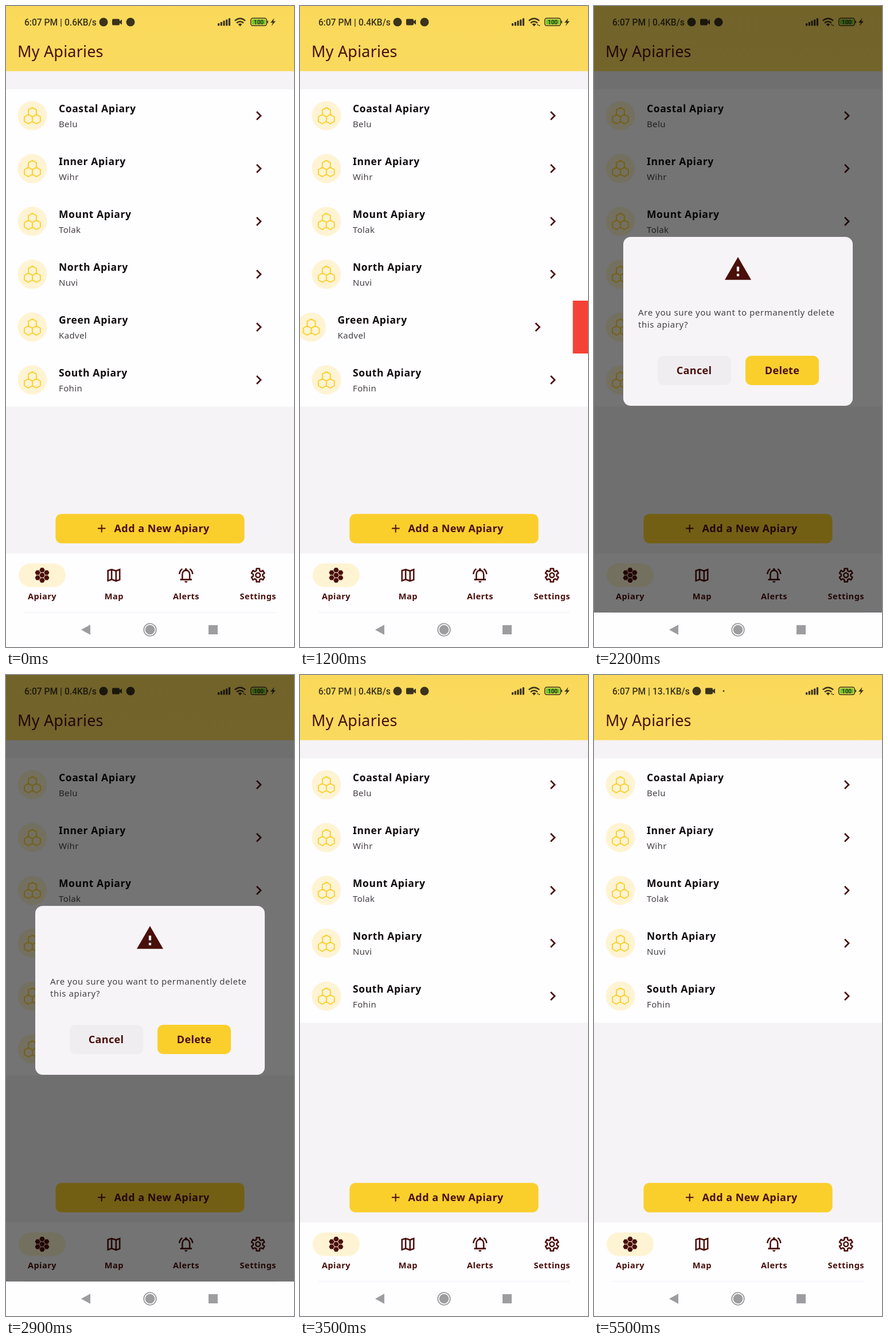
Animation of 502 by 1116 pixels, one loop 5600 ms. Source, as an HTML page:

```html
<!DOCTYPE html>
<html lang="en">
<head>
<meta charset="utf-8">
<title>My Apiaries</title>
<style>
html, body { margin: 0; width: 100%; height: 100%; overflow: hidden; background: #f5f3f6; }
svg { display: block; width: 502px; height: 1116px; font-family: "Noto Sans", "Open Sans", sans-serif; }
.dark { fill: #4a0f0b; }
.line { fill: none; stroke: #4a0f0b; stroke-width: 2; }
.chevron { stroke-width: 2.7; }
.heading { font-size: 27px; font-weight: 500; letter-spacing: .2px; }
.name { font-size: 17.5px; font-weight: 600; letter-spacing: .6px; fill: #100c0d; }
.place { font-size: 15px; letter-spacing: .35px; fill: #454042; }
.action { font-size: 18px; font-weight: 600; letter-spacing: .45px; }
.choice { font-size: 18px; font-weight: 700; letter-spacing: .3px; text-anchor: middle; }
.tab { font-size: 14.6px; font-weight: 600; letter-spacing: .45px; text-anchor: middle; }
.ask { font-size: 15px; letter-spacing: .58px; fill: #454042; }
.status { font: 500 15.6px Roboto, sans-serif; }
.level { font: 700 10px Roboto, sans-serif; text-anchor: middle; }
</style>
</head>
<body>
<svg viewBox="0 0 502 1116">
  <defs>
    <linearGradient id="sun" x2="0" y2="1">
      <stop stop-color="#fad95a"/><stop offset="1" stop-color="#fada5e"/>
    </linearGradient>
  </defs>
  <rect width="502" height="1116" fill="#f5f3f6"/>
  <rect width="502" height="113.5" fill="url(#sun)"/>

  <g fill="#3b331b">
    <text id="speed" class="status" x="32" y="33.5"></text>
    <g id="notices">
      <circle cx="170" cy="28" r="7.5"/>
      <path d="M187 22.5h9a2 2 0 0 1 2 2v2l4-3v9l-4-3v2a2 2 0 0 1-2 2h-9a2 2 0 0 1-2-2v-7a2 2 0 0 1 2-2"/>
      <circle id="lastNotice" cx="217" cy="28" r="7.5"/>
    </g>
    <g id="signal"></g>
    <g fill="none" stroke="#3b331b" stroke-width="2.4">
      <path d="M398.8 25.7q9.2-7.8 18.4 0M402 29.5q6-5 12 0"/>
    </g>
    <path d="M404.5 31.8q3.5-2.6 7 0L408 35.5z"/>
    <path id="traffic" d="M413 33.5l1.5-2.5 1.5 2.5zM415.5 33l1.5 2.5 1.5-2.5z"/>
    <rect x="426.7" y="21.2" width="27.6" height="13" rx="3.5" fill="none" stroke="#3b331b" stroke-width="1.5"/>
    <rect x="428.7" y="23.2" width="23.6" height="9" rx="1.5" fill="#6ac927"/>
    <rect x="455.3" y="25.5" width="1.7" height="4.5" rx=".8"/>
    <text class="level" x="440.5" y="31.5">100</text>
    <path d="M467.5 21l-6.5 8h4l-2.5 6 7.5-8.5h-4z"/>
  </g>
  <text class="heading dark" x="20" y="89">My Apiaries</text>

  <g id="list"></g>

  <rect x="86.4" y="884.3" width="329.2" height="51.2" rx="10" fill="#facf2c"/>
  <path class="line" d="M160 909.5h13.5M166.7 903v13.5"/>
  <text class="action dark" x="188.5" y="916">Add a New Apiary</text>

  <rect y="953" width="502" height="163" fill="#fefdff"/>
  <path d="M32 1056h439" stroke="#f0eef1"/>
  <rect x="22" y="970.5" width="82" height="41" rx="20.5" fill="#fef4d3"/>
  <path id="comb" class="dark"/>
  <g class="line">
    <path transform="translate(172.6 975.6) scale(1.28)" d="M4 5.8L9 4.2L15 6.2L20 4.3V18.2L15 19.9L9 17.8L4 19.6ZM9 4.2V17.8M15 6.2V19.9"/>
    <g transform="translate(298.4 975.6) scale(1.28)">
      <path d="M7 17V11C7 7.7 9 5.5 12 5.5S17 7.7 17 11V17M4 18H20M3 10.5C3.2 7.5 4.6 5 6.9 3.4M21 10.5C20.8 7.5 19.4 5 17.1 3.4"/>
      <path d="M12 4v1" stroke-width="3" stroke-linecap="round"/>
      <path class="dark" stroke="none" d="M10 20h4a2 2 0 0 1-4 0"/>
    </g>
    <path id="gear" stroke-width="2.5" stroke-linejoin="round"/>
    <circle cx="439.2" cy="991" r="3.9" stroke-width="2.5"/>
  </g>
  <g class="tab dark">
    <text x="63" y="1033">Apiary</text>
    <text x="188.3" y="1033">Map</text>
    <text x="314" y="1033">Alerts</text>
    <text x="439.3" y="1033">Settings</text>
  </g>

  <g id="dialog">
    <rect width="502" height="1056" opacity=".54"/>
    <rect y="1056" width="502" height="60" fill="#fefdff"/>
    <rect x="51" y="402" width="400" height="294" rx="13" fill="#f6f4f7"/>
    <path class="dark" transform="translate(225.9 432.8) scale(2.09)" d="M1 21h22L12 2 1 21zm12-3h-2v-2h2v2zm0-4h-2v-4h2v4z"/>
    <text class="ask" x="77" y="539">Are you sure you want to permanently delete</text>
    <text class="ask" x="77" y="560">this apiary?</text>
    <rect x="111" y="609" width="128" height="51" rx="10" fill="#efedf0"/>
    <rect x="264" y="609" width="128" height="51" rx="10" fill="#facf2c"/>
    <text class="choice dark" x="174.5" y="641">Cancel</text>
    <text class="choice dark" x="328" y="641">Delete</text>
  </g>

  <g fill="#9d9c9e">
    <path d="M131 1086l16-8.7v17.4z"/>
    <circle cx="251" cy="1086" r="8.3"/>
    <circle cx="251" cy="1086" r="10.8" fill="none" stroke="#9d9c9e" stroke-width="1.8"/>
    <rect x="353" y="1078" width="16" height="16"/>
  </g>
</svg>
<script>
const $ = id => document.getElementById(id);
const LOOP = 5600, ROW = 92, TOP = 145;
const apiaries = [
  ["Coastal", "Belu"], ["Inner", "Wihr"], ["Mount", "Tolak"],
  ["North", "Nuvi"], ["Green", "Kadvel"], ["South", "Fohin"]
];

const polar = (x, y, r, deg) => {
  const a = deg * Math.PI / 180;
  return [x + r * Math.cos(a), y + r * Math.sin(a)].map(v => v.toFixed(2)).join(" ");
};
const shape = points => "M" + points.join("L") + "Z";
const sixth = [0, 60, 120, 180, 240, 300];
const hexagon = (x, y, r, turn) => shape(sixth.map(a => polar(x, y, r, a + turn)));

const hexes = hexagon(46, 39.9, 8, 30) + hexagon(39, 52, 8, 30) + hexagon(53, 52, 8, 30);
$("list").innerHTML = apiaries.map(([name, place]) => `
  <g class="row">
    <rect width="502" height="92.5" fill="#fefdff"/>
    <g class="slide">
      <circle cx="46" cy="46" r="25.5" fill="#fef4d3"/>
      <path d="${hexes}" fill="none" stroke="#fbd136" stroke-width="2"/>
      <text class="name" x="92" y="40">${name} Apiary</text>
      <text class="place" x="92" y="66">${place}</text>
      <path class="line chevron" d="M437 39l7 7-7 7"/>
      <rect x="502" width="251" height="92" fill="#f54236"/>
      <path transform="translate(615.5 34)" fill="#fff" d="M6 19c0 1.1.9 2 2 2h8c1.1 0 2-.9 2-2V7H6zM19 4h-3.5l-1-1h-5l-1 1H5v2h14z"/>
    </g>
  </g>`).join("");

$("signal").innerHTML = [0, 1, 2, 3, 4].map(i =>
  `<rect x="${369 + i * 4.7}" y="${30 - i * 2.2}" width="3.2" height="${4.5 + i * 2.2}" rx="1"/>`).join("");

$("comb").setAttribute("d", hexagon(63, 991, 4.7, 0) + sixth.map(a => {
  const [x, y] = polar(63, 991, 9, a + 30).split(" ").map(Number);
  return hexagon(x, y, 4.7, 0);
}).join(""));

$("gear").setAttribute("d", shape(sixth.flatMap(a =>
  [[8.4, -20], [11.9, -13], [11.9, 13], [8.4, 20]].map(([r, d]) => polar(439.2, 991, r, a + 30 + d)))));

const rows = [...document.querySelectorAll(".row")];
const green = rows[4].querySelector(".slide");
const show = (el, on) => el.style.display = on ? "" : "none";
const smooth = u => {
  u = Math.min(1, Math.max(0, u));
  return u * u * (3 - 2 * u);
};

function draw() {
  const t = performance.now() % LOOP;
  const removed = t >= 3400, busy = t >= 4600;

  const swipe = t < 2200 ? 251 * smooth((t - 1060) / 700) : 0;
  green.setAttribute("transform", `translate(${-swipe} 0)`);
  rows.forEach((row, i) => {
    const place = removed && i > 4 ? i - 1 : i;
    row.setAttribute("transform", `translate(0 ${TOP + place * ROW})`);
  });
  show(rows[4], !removed);
  show($("dialog"), t >= 2200 && t < 3500);

  $("speed").textContent = `6:07 PM | ${t < 600 ? "0.6" : busy ? "13.1" : "0.4"}KB/s`;
  $("notices").setAttribute("transform", `translate(${busy ? 9 : 0} 0)`);
  $("lastNotice").setAttribute("r", busy ? 1.4 : 7.5);
  show($("traffic"), t >= 600);
  requestAnimationFrame(draw);
}
draw();
</script>
</body>
</html>
```
